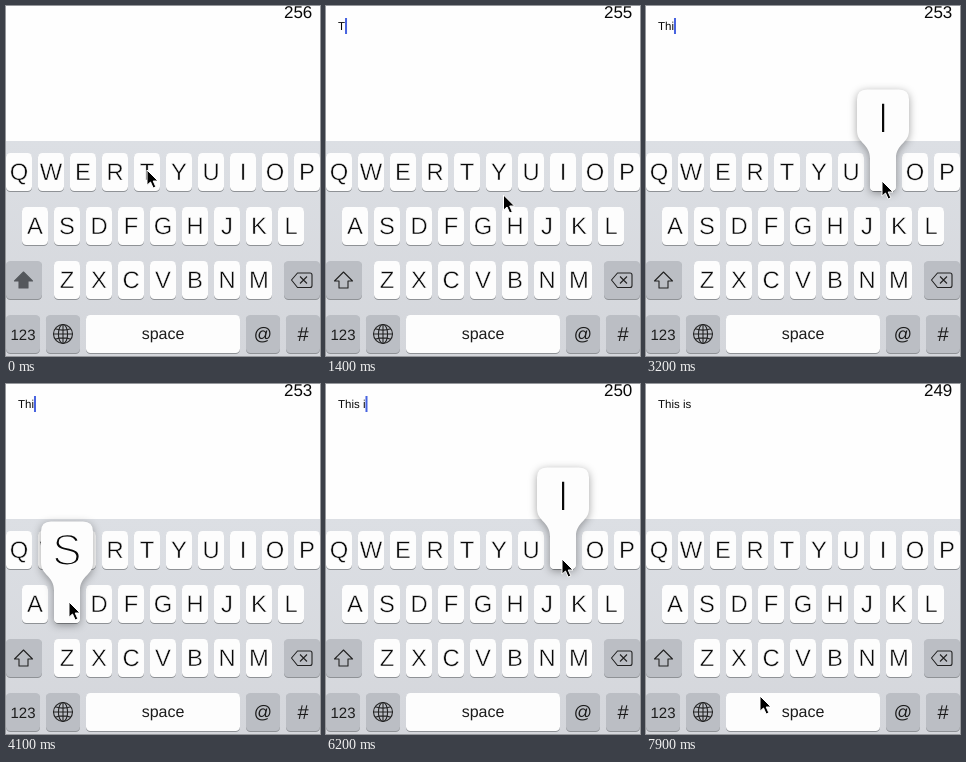
Write an HTML page that moves like this. It is 314 px wide and 350 px high and loops after 8 s.

```html
<!DOCTYPE html>
<html lang="en">
<head>
<meta charset="utf-8">
<title>Typing on a touch keyboard</title>
<style>
  html, body { margin: 0; width: 100%; height: 100%; overflow: hidden; background: #fff; }
  svg { display: block; width: 314px; height: 350px; font-family: "Liberation Sans", Arial, sans-serif; }
  text { fill: #080808; white-space: pre; text-rendering: geometricPrecision; }
  .mid { text-anchor: middle; }
  .letter { font-size: 23.8px; stroke: #fdfdfd; stroke-width: .5; }
  .big { font-size: 44px; stroke: #fdfdfd; stroke-width: 1.9; }
  .label { fill: #1c1c1c; }
  .line { fill: none; stroke: #222; stroke-width: 1.1; stroke-linejoin: round; }
  .popup path { fill: #fdfdfd; filter: drop-shadow(0 2px 4px rgba(0, 0, 0, .36)); }
</style>
</head>
<body>
<svg viewBox="0 0 314 350">
  <defs>
    <linearGradient id="board" x1="0" y1="0" x2="0" y2="1">
      <stop offset="0" stop-color="#dcdfe4"/>
      <stop offset="1" stop-color="#d4d6db"/>
    </linearGradient>
  </defs>
  <rect width="314" height="350" fill="#fefefe"/>
  <text id="count" x="306.3" y="12" font-size="17" text-anchor="end"></text>
  <text id="typed" x="12" y="24.3" font-size="11.5"></text>
  <rect id="caret" y="12" width="2" height="16" fill="#4763e0"/>
  <rect y="135" width="314" height="215" fill="url(#board)"/>
  <g id="keys"></g>
  <path id="shift" class="line" d="M17.500 266L26.500 275H22V282H13V275H8.500Z"/>
  <path class="line" d="M285.500 274L291.500 267H304Q306 267 306 269V279.500Q306 281.500 304 281.500H291.500ZM294 270.500L301 277.500M301 270.500L294 277.500"/>
  <g class="line" transform="translate(57 328)">
    <circle r="9.500"/>
    <ellipse rx="4.600" ry="9.500"/>
    <path d="M0-9.500V9.500M-9.500 0H9.500M-7.800-5.200Q0-2.600 7.800-5.200M-7.800 5.200Q0 2.600 7.800 5.200"/>
  </g>
  <g id="popup" class="popup">
    <path d="M-26 10.500q0-10 10-10h32q10 0 10 10v31c0 13-13 13-13 28v28.500q0 4-4 4h-18q-4 0-4-4v-28.500c0-15-13-15-13-28z"/>
    <text id="big" class="mid big" y="43.800"></text>
  </g>
  <path id="pointer" d="M0 0V15.200L3.500 12L6.200 18L8.800 16.800L6.200 11H11Z" fill="#000" stroke="#fff" stroke-width="1"/>
</svg>
<script>
const LOOP = 8000;
const WHITE = '#fdfdfd', GRAY = '#bbbec4';
const $ = id => document.getElementById(id);
const keysAt = {};

function add(name, attrs, label = '') {
  const node = document.createElementNS('http://www.w3.org/2000/svg', name);
  for (const key in attrs) node.setAttribute(key, attrs[key]);
  node.textContent = label;
  return $('keys').appendChild(node);
}

function addKey(x, y, width, fill) {
  add('rect', { x, y: y + 1, width, height: 38, rx: 4.5, fill: '#8f9296' });
  return add('rect', { x, y, width, height: 38, rx: 4.5, fill });
}

[['QWERTYUIOP', 0], ['ASDFGHJKL', 16], ['ZXCVBNM', 48]].forEach(([row, left], r) => {
  [...row].forEach((ch, i) => {
    const x = left + i * 32, y = 147 + r * 54;
    keysAt[ch] = { x: x + 13, y };
    addKey(x, y, 26, WHITE);
    add('text', { x: x + 13, y: y + 27.3, class: 'mid letter' }, ch);
  });
});

addKey(0, 255, 36, GRAY);
addKey(278, 255, 36, GRAY);
addKey(0, 309, 34, GRAY);
addKey(40, 309, 34, GRAY);
const space = addKey(80, 309, 154, WHITE);
addKey(240, 309, 34, GRAY);
addKey(280, 309, 34, GRAY);
[['123', 17, 333.7, 15], ['space', 157, 332.7, 16], ['@', 257, 333.7, 18], ['#', 297, 335, 20]]
  .forEach(([text, x, y, size]) => add('text', { x, y, 'font-size': size, class: 'mid label' }, text));

// key, press, character appears, release
const presses = [
  ['T', 600, 1000, 1100], ['H', 1700, 2000, 2100], ['I', 3000, 3100, 3250],
  ['S', 4100, 4300, 4400], [' ', 4800, 5200, 5200], ['I', 5900, 6100, 6250],
  ['S', 7100, 7300, 7400]
];
const message = 'This is';

// start, end, x, y
const moves = [
  [0, 0, 141, 164], [1100, 1400, 177.5, 189], [1400, 1650, 196, 217],
  [2300, 2750, 236, 175], [3300, 3900, 63, 218], [4400, 4650, 118, 316],
  [5250, 5750, 236, 175], [6250, 6650, 66, 222], [6650, 6900, 63, 219],
  [7400, 7850, 114, 312]
];

function pointerAt(t) {
  let [, , x, y] = moves[0];
  for (const [from, to, nx, ny] of moves) {
    if (t < from || to === from) continue;
    const p = Math.min(1, (t - from) / (to - from));
    const e = p * p * (3 - 2 * p);
    x += (nx - x) * e;
    y += (ny - y) * e;
  }
  return [x, y];
}

const widths = [...message, ''].map((_, i) => {
  $('typed').textContent = message.slice(0, i);
  return i ? $('typed').getComputedTextLength() : 0;
});

function draw(t) {
  const n = presses.filter(p => t >= p[2]).length;
  const since = t - (n ? presses[n - 1][2] : -600);
  $('typed').textContent = message.slice(0, n);
  $('count').textContent = 256 - n;
  $('caret').setAttribute('x', 12 + widths[n]);
  $('caret').style.opacity = since % 800 < 550 ? 1 : 0;
  $('shift').style.fill = n ? 'none' : '#54575c';
  $('shift').style.stroke = n ? '#222' : '#54575c';

  const down = presses.find(p => t >= p[1] && t < p[3]);
  const key = down && keysAt[down[0]];
  space.setAttribute('fill', down && !key ? GRAY : WHITE);
  $('popup').style.display = key ? '' : 'none';
  if (key) {
    $('popup').setAttribute('transform', `translate(${key.x} ${key.y - 64})`);
    $('big').textContent = down[0];
  }
  $('pointer').setAttribute('transform', `translate(${pointerAt(t)})`);
}

const start = performance.now();
(function tick() {
  draw((performance.now() - start) % LOOP);
  requestAnimationFrame(tick);
})();
</script>
</body>
</html>
```
